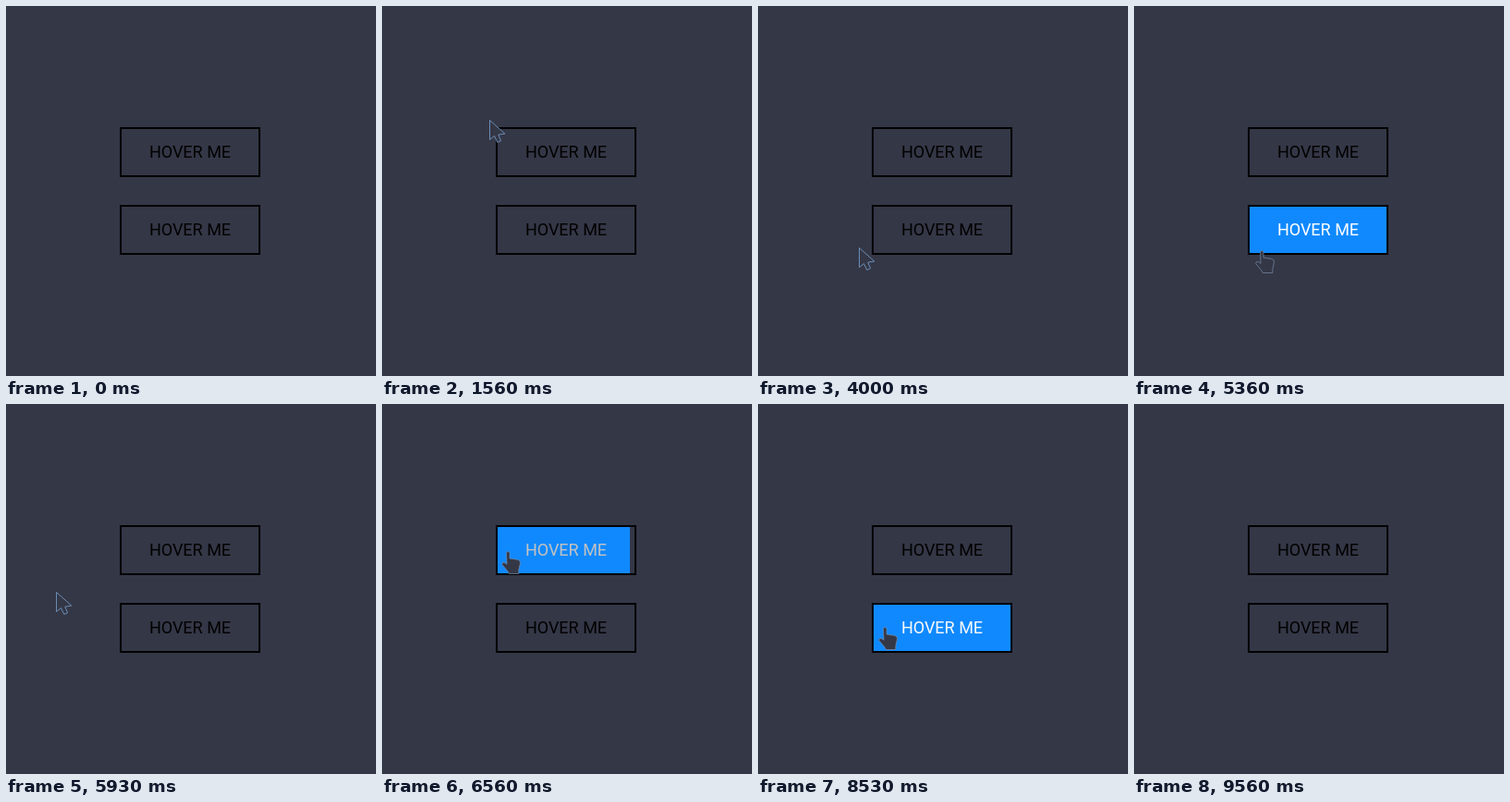
Write an HTML page that moves like this. It is 400 px wide and 400 px high and loops after 10 s.

```html
<!DOCTYPE html>
<html lang="en">
<head>
<meta charset="utf-8">
<title>Hover buttons</title>
<style>
  html, body { margin: 0; width: 100%; height: 100%; overflow: hidden; background: #343746; }
  .stage { position: relative; width: 400px; height: 400px; overflow: hidden; }
  .btn {
    position: absolute; left: 123px; box-sizing: border-box;
    width: 152px; height: 54px; border: 2px solid #000;
    font: 18px/50px Roboto, sans-serif; text-align: center; white-space: nowrap;
  }
  .first { top: 131px; }
  .second { top: 215px; }
  .fill { position: absolute; top: 0; height: 50px; background: #1089ff; }
  .label { position: relative; }
  .cursor { position: absolute; left: 0; top: 0; overflow: visible; }
  .cursor path { fill: #343746; stroke: #7298c2; stroke-width: .9; stroke-linejoin: round; }
  .cursor .hand { stroke: #748fa8; stroke-width: .7; }
</style>
</head>
<body>
<div class="stage">
  <div class="btn first"><div class="fill"></div><span class="label">HOVER ME</span></div>
  <div class="btn second"><div class="fill"></div><span class="label">HOVER ME</span></div>
  <svg class="cursor" width="21" height="25">
    <path class="arrow" d="M.5 .5V21.5L5.5 17.5L8.8 24.4L12.6 22.7L9.8 16.2L16.8 15Z"/>
    <path class="hand" d="M-2.5 2.2Q-2.5 .5 -.8 .5Q1 .5 1 2.3V8L9.5 9.3Q12.7 9.8 12.5 13L10.8 20.5V24.5H.2L-1 22L-7.2 14.6Q-7.6 12.4 -5 12.3L-2 14.2Z"/>
  </svg>
</div>
<script>
const LOOP = 10000, FADE = 500, WIDTH = 148;

// Pointer strokes as [time, x, y]; the pointer rests between them.
const strokes = [
  [[860, 29, 382], [1000, -25, 360]],
  [[1330, 7, 200], [1540, 108, 123], [1600, 124, 131], [1900, 160, 145]],
  [[2430, 160, 145], [2460, 158, 148], [2630, 144, 169]],
  [[2970, 144, 169], [3080, 122, 184], [3480, 66, 224], [3850, 88, 257],
   [4000, 109, 261], [4090, 124, 262], [4320, 142, 260]],
  [[5330, 142, 260], [5360, 139, 264], [5430, 121, 266], [5800, 34, 225],
   [6180, 123, 160], [6400, 135, 157], [6560, 137, 159], [6700, 140, 161]],
  [[7030, 140, 161], [7105, 122, 166], [7500, 44, 210], [7800, 71, 234],
   [8040, 124, 240], [8200, 138, 241]],
  [[8930, 138, 241], [9060, 121, 244], [9440, -30, 235]]
];

const buttons = [
  { name: '.first', hovers: [[1600, 3080], [6180, 7105]], passRight: false },
  { name: '.second', hovers: [[4090, 5430], [8040, 9060]], passRight: true }
].map(b => ({
  ...b,
  fill: document.querySelector(b.name + ' .fill'),
  label: document.querySelector(b.name + ' .label')
}));

const cursor = document.querySelector('.cursor');
const arrow = document.querySelector('.arrow');
const hand = document.querySelector('.hand');
const clamp = v => Math.min(1, Math.max(0, v));

// cubic-bezier(.25, .1, .25, 1)
function ease(x) {
  const curve = (u, a, b) => 3 * u * (1 - u) ** 2 * a + 3 * u * u * (1 - u) * b + u ** 3;
  let lo = 0, hi = 1;
  for (let i = 0; i < 24; i++) {
    const mid = (lo + hi) / 2;
    if (curve(mid, .25, .25) < x) lo = mid; else hi = mid;
  }
  return curve(lo, .1, 1);
}

function slope(points, i, axis) {
  if (i === 0 || i === points.length - 1) return 0;
  const a = points[i - 1], b = points[i + 1];
  return (b[axis] - a[axis]) / (b[0] - a[0]);
}

function pointerAt(t) {
  const points = strokes.filter(s => s[0][0] <= t).pop();
  if (!points) return null;
  const i = points.findIndex(p => p[0] > t) - 1;
  if (i < 0) return points[points.length - 1].slice(1);
  const a = points[i], b = points[i + 1], span = b[0] - a[0], u = (t - a[0]) / span;
  return [1, 2].map(k =>
    a[k] * (1 + 2 * u) * (1 - u) ** 2 + slope(points, i, k) * span * u * (1 - u) ** 2 +
    b[k] * u * u * (3 - 2 * u) - slope(points, i + 1, k) * span * u * u * (1 - u));
}

function drawButton(b, t) {
  const [from, to] = b.hovers.filter(h => h[0] <= t).pop() || [LOOP, LOOP];
  const over = t >= from && t < to;
  const enter = clamp((t - from) / FADE), leave = clamp((t - to) / FADE);
  const width = WIDTH * (ease(enter) - ease(leave));
  b.fill.style.width = width + 'px';
  b.fill.style.left = (b.passRight && !over ? WIDTH - width : 0) + 'px';
  const tone = Math.round(255 * (enter - leave));
  b.label.style.color = `rgb(${tone}, ${tone}, ${tone})`;
  return over;
}

function draw(t) {
  const over = buttons.map(b => drawButton(b, t)).some(Boolean);
  const at = pointerAt(t);
  cursor.style.display = at ? '' : 'none';
  if (at) cursor.style.transform = `translate(${Math.round(at[0])}px, ${Math.round(at[1])}px)`;
  arrow.style.display = over ? 'none' : '';
  hand.style.display = over ? '' : 'none';
}

const start = performance.now();
function tick() {
  draw((performance.now() - start) % LOOP);
  requestAnimationFrame(tick);
}
tick();
</script>
</body>
</html>
```
